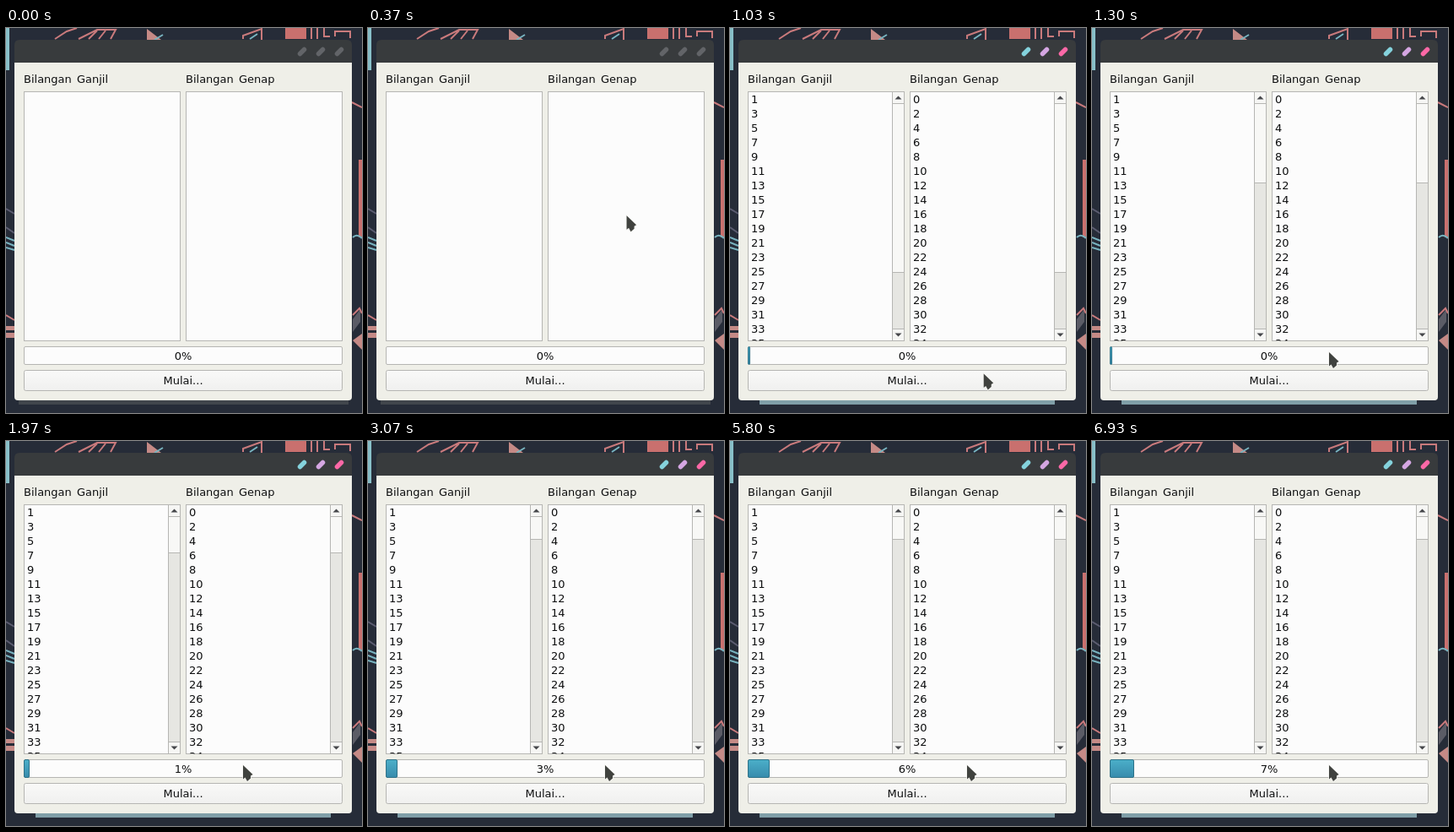
Recreate the animation shown at these times as an HTML page. Size 422 by 456 pixels, loop 8 s.

```html
<!DOCTYPE html>
<html lang="id">
<head>
<meta charset="utf-8">
<style>
  html, body { margin: 0; width: 100%; height: 100%; overflow: hidden; background: #262c38; }
  svg { display: block; width: 422px; height: 456px; }
  text { font: 13px "DejaVu Sans", sans-serif; word-spacing: 2px; fill: #0e0f10; }
  .mid { text-anchor: middle; }
  .line { fill: none; stroke-width: 2; }
  .box { fill: #fcfcfc; stroke: #b6b6b3; }
</style>
</head>
<body>
<svg viewBox="0 0 422 456" xmlns="http://www.w3.org/2000/svg">
  <defs>
    <linearGradient id="teal" x2="0" y2="1">
      <stop offset="0" stop-color="#4bafc9"/><stop offset="1" stop-color="#378bac"/>
    </linearGradient>
    <linearGradient id="button" x2="0" y2="1">
      <stop offset="0" stop-color="#f9f9f8"/><stop offset="1" stop-color="#f0f0ef"/>
    </linearGradient>
    <clipPath id="view"><rect x="0" y="76" width="422" height="294.5"/></clipPath>
  </defs>

  <!-- wallpaper -->
  <rect width="422" height="456" fill="#262c38"/>
  <path d="M0 0H4V50H0Z" fill="#88bfc8"/>
  <path d="M167 1L184 14H167ZM0 353H10V358H0ZM0 361H10V367H0ZM411 370L422 362V381Z" fill="#c58a86"/>
  <path d="M331 0H356V13H331ZM418 156H422V248H418Z" fill="#c9706e"/>
  <path d="M411 345L420 333V348L411 360Z" fill="#5b5c66"/>
  <g class="line" stroke="#c97a7c">
    <path d="M58 13L72 4L84 0M86 13L108 2H130L124 13M98 13L108 3M110 13L118 3"/>
    <path d="M281 13V9L303 1V14M362 0V13M369 0V13M377 0V10H384M390 10V4H408V12"/>
    <path d="M410 88L422 94M411 340L419 332L422 338M0 340L10 346"/>
  </g>
  <g class="line" stroke="#78b4c0">
    <path d="M176 14L186 8M289 13L298 7M0 248L10 252M0 254L10 258M0 260L10 263M411 248Q416 243 422 249"/>
  </g>
  <path class="line" d="M0 214L10 220M0 236L10 243" stroke="#5b5c70"/>

  <!-- window -->
  <path id="shade"/>
  <path d="M10 41V20Q10 14 16 14H404Q410 14 410 20V41Z" fill="#383b3d"/>
  <path d="M10 41H410V437Q410 441 406 441H14Q10 441 10 437Z" fill="#efefe8"/>
  <g id="pills" stroke-width="5.5" stroke-linecap="round"></g>
  <text x="21" y="65">Bilangan Ganjil</text>
  <text x="213" y="65">Bilangan Genap</text>
  <g id="lists"></g>

  <rect class="box" x="21.5" y="377.5" width="377" height="21" rx="1.5"/>
  <rect id="fill" x="21.5" y="377.5" height="21" rx="1.5" fill="url(#teal)" stroke="#2f7288"/>
  <text id="pct" class="mid" x="210" y="393"></text>
  <rect x="21.5" y="405.5" width="377" height="24" rx="2" fill="url(#button)" stroke="#b6b6b3"/>
  <text class="mid" x="210" y="422">Mulai...</text>

  <path id="cursor" d="M0 0V16.500L2.500 14.500L5 19L9 15.500V12.500L11.500 11Z"
    fill="#40423f" stroke="#f4f4f0" stroke-width="1.500" paint-order="stroke"/>
</svg>
<script>
const LOOP = 8000, START = 800, CLICK = 840, ROWS = 18;
const STEPS = [1465, 2200, 3030, 3870, 4800, 5800, 6900];
const $ = id => document.getElementById(id);

function add(parent, tag, attrs, label = '') {
  const el = document.createElementNS('http://www.w3.org/2000/svg', tag);
  for (const key in attrs) el.setAttribute(key, attrs[key]);
  el.textContent = label;
  parent.append(el);
  return el;
}

function makeList(x, first) {
  const g = $('lists');
  add(g, 'rect', { class: 'box', x: x + .5, y: 75.5, width: 185, height: 295 });
  const clip = add(g, 'g', { 'clip-path': 'url(#view)' });
  const rows = Array.from({ length: ROWS }, (_, i) =>
    add(clip, 'text', { x: x + 4, y: 89 + 17 * i }, first + 2 * i));
  const bar = add(g, 'g', {});
  const rect = (y, h, fill) =>
    add(bar, 'rect', { x: x + 171.5, y, width: 14, height: h, fill, stroke: '#b6b6b3' });
  rect(75.5, 295, '#e6e6e2');
  rect(75.5, 14, '#f6f6f4');
  rect(356.5, 14, '#f6f6f4');
  const thumb = rect(89.5, 0, '#f8f8f6');
  add(bar, 'path', { d: `M${x + 174.5} 84.5l4 -4l4 4zM${x + 174.5} 361.5l4 4l4 -4z`, fill: '#45464a' });
  return { rows, bar, thumb };
}

const lists = [makeList(21, 1), makeList(213, 0)];
const pills = ['#84d2dc', '#d4a6e2', '#fc68a6'].map((color, i) => ({
  color, el: add($('pills'), 'path', { d: `M${348.5 + 22 * i} 30.500l5 -5` })
}));

const clamp = v => Math.min(1, Math.max(0, v));
const ease = v => v * v * (3 - 2 * v);
const span = (t, a, b) => ease(clamp((t - a) / (b - a)));
const show = (el, on) => el.setAttribute('visibility', on ? 'visible' : 'hidden');

function mix(a, b, k) {
  const part = (c, i) => parseInt(c.slice(i, i + 2), 16);
  return `rgb(${[1, 3, 5].map(i => Math.round(part(a, i) + (part(b, i) - part(a, i)) * k))})`;
}

// Adding n items takes A n + B n² ms, so the lists fill ever more slowly.
function count(t) {
  const A = 9.7, B = .0082;
  if (t < CLICK) return 0;
  return Math.floor((Math.sqrt(A * A + 4 * B * (t - START)) - A) / (2 * B));
}

function draw(t) {
  const focus = span(t, 640, 760);
  for (const { el, color } of pills) el.setAttribute('stroke', mix('#626468', color, focus));
  $('shade').setAttribute('d', focus < .5 ? 'M15 440H406V446H15Z' : 'M35 440H385V446H35Z');
  $('shade').setAttribute('fill', mix('#41464c', '#809fa8', focus));

  const n = count(t);
  for (const { rows, bar, thumb } of lists) {
    rows.forEach((row, i) => show(row, i < n));
    bar.style.display = n > 17 ? '' : 'none';
    const size = 266 * 17.2 / Math.max(n, 18);
    thumb.setAttribute('height', Math.round(Math.max(26, size)) + 1);
  }

  const p = STEPS.filter(s => t >= s).length;
  $('pct').textContent = p + '%';
  $('fill').setAttribute('width', Math.round(2 + 3.78 * p));
  $('fill').style.display = n > 0 ? '' : 'none';

  const enter = span(t, 20, 680), leave = span(t, 880, 1250);
  const x = 300 + 12 * enter - 31 * leave;
  const y = -22 + 446 * enter - 40 * leave;
  $('cursor').setAttribute('transform', `translate(${x} ${y})`);
}

const begin = performance.now();
function tick() {
  draw((performance.now() - begin) % LOOP);
  requestAnimationFrame(tick);
}
tick();
</script>
</body>
</html>
```
